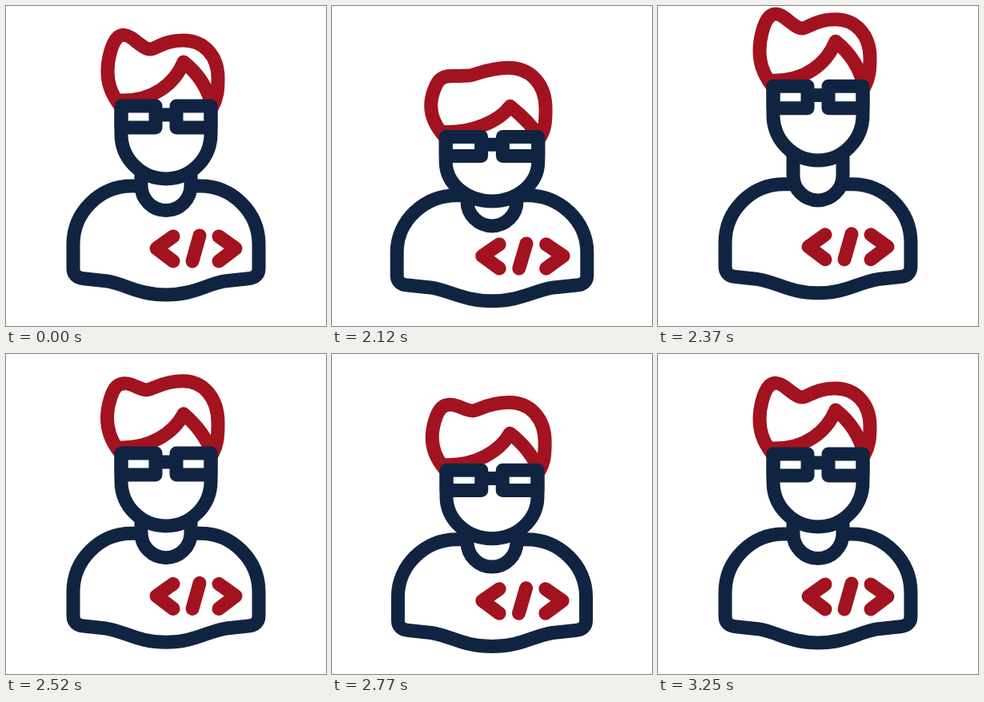
These frames come from a looping animation (400x400 px, 3.27 s). An HTML page:

```html
<!DOCTYPE html>
<html lang="en">
<head>
<meta charset="utf-8">
<title>Developer avatar</title>
<style>
  html, body { margin: 0; height: 100%; overflow: hidden; background: #fff; }
  svg { display: block; width: 100%; height: 100%; }
  path { vector-effect: non-scaling-stroke; }
  .red { stroke: #a2131f; }
</style>
</head>
<body>
<svg viewBox="0 0 400 400" fill="none" stroke="#102442" stroke-width="17" stroke-linecap="round" stroke-linejoin="round">
  <g id="body">
    <path d="M165 225H157C117 225 84 258 84 298V328C84 336 89 340.2 97 340.7L125 343.7C150 347.7 165 361 200 361S250 347.7 275 343.7L303 340.7C311 340.2 316 336 316 328V298C316 258 283 225 243 225H235"/>
    <path class="red" d="M209 288L188 303L209 319M242 287L233 319M266 288L287 303L266 319"/>
  </g>
  <path id="collar"/>
  <g id="head">
    <path fill="#fff" d="M144 125V160A56 56 0 0 0 256 160V125"/>
    <path id="hair" class="red"/>
    <path d="M144 125H187V152H144ZM213 125H256V152H213ZM187 136H213"/>
  </g>
</svg>
<script>
const LOOP = 3270, START = 2020, STEP = 25;
const [body, collar, head, hair] = ['body', 'collar', 'head', 'hair'].map(id => document.getElementById(id));

const ease = u => {
  u = Math.min(1, Math.max(0, u));
  return u * u * (3 - 2 * u);
};

// Eased rise from 0 to 1 and back
const bump = (t, from, peak, to) => t < peak
  ? ease((t - from) / (peak - from))
  : 1 - ease((t - peak) / (to - peak));

const scaleAt = (y, dy, sx, sy) => `translate(200 ${y + dy}) scale(${sx} ${sy}) translate(-200 ${-y})`;

// f flattens the quiff: valley and crown rise, the fringe tip drops
function hairPath(f) {
  const valleyX = 180 - 8 * f, valleyY = 54 - 16 * f;
  const crownX = 222 - 2 * f, crownY = 43 - 16 * f;
  return `M143 125C130 108 ${127 - f} 95 ${127 - f} 81S132 48 138 ${41 + 2 * f}
    S151 ${36 + 3 * f} 157 ${40 - f}S${valleyX - 7 + f} ${valleyY} ${valleyX} ${valleyY}
    S${crownX - 25} ${crownY} ${crownX} ${crownY}S265 ${62 - 14 * f} 265 ${90 - 5 * f}
    C265 106 264 115 258 126C${252 - 2 * f} ${102 + 10 * f} ${240 - 2 * f} ${84 + 13 * f} 222 ${70 + 12 * f}
    C${211 - 4 * f} ${97 + 8 * f} ${184 - 10 * f} 119 143 118`;
}

function draw(now) {
  const time = now % LOOP;
  const t = time < START ? 0 : START + Math.floor((time - START) / STEP) * STEP;

  // Crouch, hop, land, rebound; the head trails the body
  const landing = bump(t, 2520, 2645, 2895);
  const rebound = bump(t, 2770, 2895, 3245);
  const hop = bump(t, 2095, 2345, 2545);
  const squash = bump(t, 1970, 2095, 2220) + landing;
  const dip = bump(t, 1995, 2095, 2345) + landing;
  const flatness = bump(t, 2020, 2130, 2345) + bump(t, 2395, 2645, 2895);

  const bodyY = 9 * squash - 3 * (bump(t, 2095, 2220, 2645) + rebound);
  const chin = 29.5 * dip - 24 * hop - 1.2 * rebound;
  const tall = 1 - .12 * dip + .02 * hop + .012 * rebound;
  body.setAttribute('transform', scaleAt(361, bodyY, 1 + .027 * squash, 1 - .033 * squash));
  head.setAttribute('transform', scaleAt(216, chin, 1 + .035 * squash, tall));

  const neck = 224.5 + (bodyY + 3.5 * squash + chin) / 2;
  collar.setAttribute('d', `M169 ${208 + chin}V${neck}A31 31 0 0 0 231 ${neck}V${208 + chin}`);
  hair.setAttribute('d', hairPath(flatness));
  requestAnimationFrame(() => draw(performance.now()));
}
draw(0);
</script>
</body>
</html>
```
